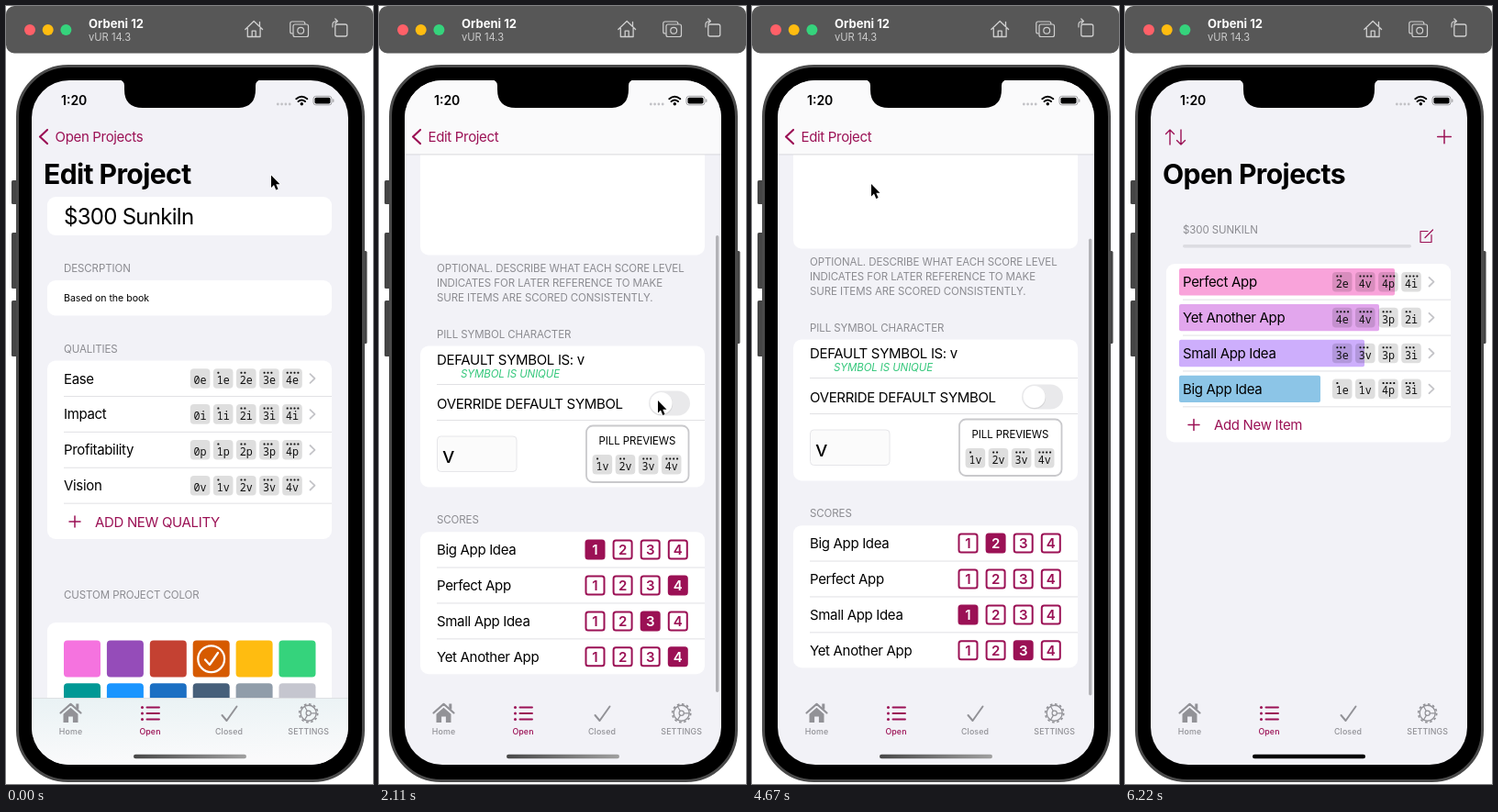
Write an HTML page that moves like this. It is 400 px wide and 848 px high and loops after 7170 ms.

```html
<!DOCTYPE html>
<html lang="en">
<head>
<meta charset="utf-8">
<title>Project scoring walkthrough</title>
<style>
  html, body { margin: 0; width: 100%; height: 100%; overflow: hidden; background: #fff; }
  svg { display: block; width: 100%; height: 100%; font-family: Inter, sans-serif; font-optical-sizing: none; }
  .body { font-size: 15px; letter-spacing: -.022em; }
  .caps { font-size: 11.5px; letter-spacing: -.008em; }
  .small { font-size: 10.6px; letter-spacing: -.003em; }
  .field { font-size: 24px; letter-spacing: -.03em; }
  .large { font-size: 30.1px; font-weight: 700; letter-spacing: -.02em; }
  .inline { font-size: 15px; font-weight: 600; letter-spacing: -.022em; }
  .tab { font-size: 8.85px; font-weight: 500; letter-spacing: .01em; }
  .clock { font-size: 14px; font-weight: 600; }
  .device { font-size: 13px; font-weight: 700; }
  .system { font-size: 11.2px; }
  .pill { font: 11.7px "Noto Sans Mono", monospace; }
  .score { font-size: 15px; font-weight: 600; }
  .note { font-size: 11.5px; font-style: italic; letter-spacing: -.01em; }
</style>
</head>
<body>
<svg id="stage" viewBox="0 0 400 848"></svg>
<script>
const LOOP = 7170, FPS = 9;
const ACCENT = '#9b1155', PAGE = '#f2f2f7', GREY = '#8b8b90', RULE = '#e1e1e4';
const ROW = 38.9, SCREEN_WIDTH = 345;

// Drawing helpers, each returning SVG markup
const rect = (x, y, w, h, r, fill, extra = '') =>
  `<rect x="${x}" y="${y}" width="${w}" height="${h}" rx="${r}" fill="${fill}" ${extra}/>`;
const circle = (x, y, r, fill, extra = '') =>
  `<circle cx="${x}" cy="${y}" r="${r}" fill="${fill}" ${extra}/>`;
const stroke = (d, color, width, extra = '') =>
  `<path d="${d}" fill="none" stroke="${color}" stroke-width="${width}" stroke-linecap="round" stroke-linejoin="round" ${extra}/>`;
const text = (x, y, s, style, fill = '#000', anchor = 'start') =>
  `<text x="${x}" y="${y}" class="${style}" fill="${fill}" text-anchor="${anchor}">${s}</text>`;
const gradient = (id, direction, from, to) =>
  `<linearGradient id="${id}" ${direction}><stop stop-color="${from}"/><stop offset="1" stop-color="${to}"/></linearGradient>`;
const group = (inner, attrs) => `<g ${attrs}>${inner}</g>`;
const repeat = (n, draw) => Array.from({ length: n }, (_, i) => draw(i)).join('');

const card = (y, h) => rect(45, y, 310, h, 9, '#fff');
const caption = (y, s) => text(63, y, s, 'caps', GREY);
const rule = y => rect(63, y - .5, 292, 1, 0, RULE);
const plus = (x, y, r, w) => stroke(`M${x - r} ${y}h${2 * r}M${x} ${y - r}v${2 * r}`, ACCENT, w);
const chevron = y => stroke(`M331.5 ${y - 4.8}l5 4.8-5 4.8`, '#c4c4c8', 1.8);

function pill(x, y, label) {
  const dots = repeat(+label[0], i => rect(x - 6.3 + i * 3.9, y - 7.3, 2, 2, .6, '#111'));
  return rect(x - 10.8, y - 10.8, 21.6, 21.6, 4, '#000', 'fill-opacity=".13"') + dots +
    text(x, y + 6, label, 'pill', '#111', 'middle');
}
const pills = (right, y, labels) =>
  labels.map((s, i) => pill(right - (labels.length - 1 - i) * 25.1, y, s)).join('');

// Piecewise linear track through [step, ...values]
function track(keys, step) {
  const next = keys.findIndex(key => key[0] > step);
  if (next === 0) return keys[0].slice(1);
  if (next < 0) return keys.at(-1).slice(1);
  const a = keys[next - 1], b = keys[next], u = (step - a[0]) / (b[0] - a[0]);
  return a.slice(1).map((v, i) => v + (b[i + 1] - v) * u);
}

// Navigation depth: 0 project list, 1 project editor, 2 quality editor
const DEPTH = [[8, 1], [9, 1.12], [10, 1.6], [11, 1.88], [12, 1.97], [13, 2],
  [45, 2], [46, 1.5], [47, 1.1], [48, 1], [49, .6], [50, .2], [51, .02], [52, 0]];
const SCROLL = [[15, 0], [16, 38], [17, 100], [18, 150], [19, 170], [20, 177]];
const CURSOR = [[1, 289, 184.5], [2, 290, 192], [3, 295, 235], [4, 308, 345], [5, 332, 490],
  [6, 348, 582], [7, 340, 545], [8, 332, 518], [12, 332, 518], [14, 325, 532], [15, 323, 522],
  [16, 321, 485], [18, 316, 400], [19, 304, 430], [21, 262, 580], [22, 258, 594],
  [24, 258, 596], [27, 258, 596], [29, 305, 625], [30, 322, 632], [31, 326, 626],
  [32, 318, 632], [34, 236, 664], [35, 240, 668], [37, 295, 702], [38, 295, 702],
  [39, 284, 665], [41, 175, 300], [42, 130, 194], [43, 103, 160], [44, 90, 147]];
const PRESSES = [[8, 332, 519, 19], [14, 326, 536, 25], [15, 324, 533, 21], [16, 321, 496, 21],
  [17, 319, 452, 21], [25, 257, 598, 26], [26, 257, 597, 16], [31, 326, 626, 16],
  [34, 236, 664, 16], [37, 295, 702, 15], [45, 90, 147, 25], [46, 90, 147, 16],
  [48, 90, 147, 25], [49, 90, 147, 16]];
const CURSOR_HIDDEN = 56;

// Score taps: step, row, value; tapping the current value clears it
const ITEMS = ['Big App Idea', 'Perfect App', 'Small App Idea', 'Yet Another App'];
const TAPS = [[25, 0, 2], [31, 1, 4], [34, 2, 1], [37, 3, 3]];
function scoresAt(step) {
  const scores = [1, 4, 3, 4];
  for (const [at, row, value] of TAPS)
    if (step >= at) scores[row] = scores[row] === value ? 0 : value;
  return scores;
}

const back = (label, pressed) => group(
  stroke('M45 135l-8 7.5 8 7.5', ACCENT, 2.2) + text(53.5, 147.5, label, 'body', ACCENT),
  `opacity="${pressed ? .2 : 1}"`);

function projectList() {
  const rows = [
    ['Perfect App', 235, '#f9a3da', '2e 4v 4p 4i'],
    ['Yet Another App', 218, '#e2a6ed', '4e 4v 3p 2i'],
    ['Small App Idea', 202, '#cdaefc', '3e 3v 3p 3i'],
    ['Big App Idea', 154, '#8cc5e7', '1e 1v 4p 3i'],
  ];
  const content = text(41, 194, 'Open Projects', 'large') + caption(248, '$300 SUNKILN') +
    rect(63, 260, 249, 3.5, 1.7, '#dcdce1') +
    stroke('M330 245.5h-8v12h12v-8M327 252.5l8.5-8.5', ACCENT, 1.2) + card(281, 194.5) +
    rows.map(([name, width, color, labels], i) => {
      const y = 300.7 + i * ROW;
      return rect(59, y - 14.7, width, 29.4, 2, color) + text(63, y + 5.5, name, 'body') +
        pills(312, y, labels.split(' ')) + chevron(y) + rule(y + ROW / 2);
    }).join('') +
    plus(75, 456.5, 6, 1.5) + text(97, 462, 'Add New Item', 'body', ACCENT);
  const nav = stroke('M49 151v-16m-4.5 4.5l4.5-4.5 4.5 4.5M61 135v16m-4.5-4.5l4.5 4.5 4.5-4.5', ACCENT, 1.4) +
    plus(348, 142.5, 7.3, 1.5);
  return { content, nav };
}

function projectEditor(step) {
  const collapsed = step > 20;
  const swatches = ['#f573df', '#954cb9', '#c44132', '#d65a00', '#ffbc10', '#35d37c',
    '#009895', '#1a95ff', '#1b6fc3', '#465f7a', '#909daa', '#c5c6cf'];
  const selected = step >= 8 && step <= 10;
  const inner = card(208, 42) + text(63, 238, '$300 Sunkiln', 'field') +
    caption(290, 'DESCRPTION') + card(299, 38.5) + text(63, 322, 'Based on the book', 'small') +
    caption(377.5, 'QUALITIES') + card(386.5, 194.5) +
    (selected ? rect(45, 503, 310, 39, 0, '#d5d5d7') : '') +
    ['Ease', 'Impact', 'Profitability', 'Vision'].map((name, i) => {
      const y = 406 + i * ROW, key = name[0].toLowerCase();
      return text(63, y + 5.5, name, 'body') + chevron(y) + rule(y + ROW / 2) +
        pills(312, y, [0, 1, 2, 3, 4].map(n => n + key));
    }).join('') +
    plus(75, 562, 6, 1.5) + text(97, 567.5, 'ADD NEW QUALITY', 'body', ACCENT) +
    caption(646, 'CUSTOM PROJECT COLOR') + card(672, 126) +
    swatches.map((c, i) => rect(63 + i % 6 * 46.9, 691.5 + Math.floor(i / 6) * 46.8, 40, 40, 4, c)).join('') +
    circle(223.7, 711.7, 14.4, 'none', 'stroke="#fff" stroke-width="2.2"') +
    stroke('M217 712.5l5 5.5 9-13', '#fff', 2.3);
  return {
    content: group(inner, `transform="translate(0 ${collapsed ? -46 : 0})"`) +
      (collapsed ? '' : text(41, 194, 'Edit Project', 'large')),
    nav: back('Open Projects', step === 48) +
      (collapsed ? text(200.5, 147.5, 'Edit Project', 'inline', '#000', 'middle') : ''),
  };
}

function scoreButton(x, y, value, chosen, pressed) {
  return group(
    rect(x - 10, y - 10, 20, 20, 2.5, chosen ? ACCENT : '#fff', `stroke="${ACCENT}" stroke-width="2"`) +
    text(x, y + 5.5, value, 'score', chosen ? '#fff' : ACCENT, 'middle'),
    `opacity="${pressed ? .48 : 1}"`);
}

function qualityEditor(step, scroll) {
  const scores = scoresAt(step);
  const inner = card(208, 42) + text(63, 238, 'Vision', 'field') +
    caption(290, 'SCORING NOTES') + card(299, 142.5) +
    caption(459.5, 'OPTIONAL. DESCRIBE WHAT EACH SCORE LEVEL') +
    caption(475.5, 'INDICATES FOR LATER REFERENCE TO MAKE') +
    caption(491.5, 'SURE ITEMS ARE SCORED CONSISTENTLY.') +
    caption(531.5, 'PILL SYMBOL CHARACTER') + card(540.5, 154) +
    text(63, 560.5, 'DEFAULT SYMBOL IS: v', 'body') +
    text(89, 575, 'SYMBOL IS UNIQUE', 'note', '#34c77b') + rule(582.5) +
    text(63, 608.5, 'OVERRIDE DEFAULT SYMBOL', 'body') +
    rect(294, 589.5, 45, 27, 13.5, '#e9e9eb') +
    circle(308, 604, 12.2, '#000', 'opacity=".08"') + circle(307.6, 603, 12, '#fff') + rule(621.5) +
    rect(63.5, 639, 86.5, 38.5, 4, '#fbfbfb', 'stroke="#e6e6e9"') + text(69, 668, 'v', 'field') +
    rect(226, 627.5, 111.5, 61.5, 7, '#fff', 'stroke="#c9c9cc" stroke-width="1.8"') +
    text(281.5, 647.5, 'PILL PREVIEWS', 'caps', '#000', 'middle') +
    pills(318.7, 669.7, ['1v', '2v', '3v', '4v']) +
    caption(734, 'SCORES') + card(743.2, 155) +
    ITEMS.map((name, row) => {
      const y = 762.6 + row * ROW;
      const pressed = col => TAPS.some(([at, r, v]) => r === row && v === col && (step === at || step === at + 1));
      return text(63, y + 5.5, name, 'body') + (row < 3 ? rule(y + ROW / 2) : '') +
        repeat(4, i => scoreButton(235.5 + i * 30.1, y, i + 1, scores[row] === i + 1, pressed(i + 1)));
    }).join('');
  const bar = rect(28, 81, SCREEN_WIDTH, 81, 0, '#fafafb') + rect(28, 161.5, SCREEN_WIDTH, .8, 0, '#d2d2d5') +
    rect(367, 165 + scroll / 2, 3.4, 498, 1.7, '#b3b3b7');
  return {
    content: group(inner, `transform="translate(0 ${-scroll})"`),
    nav: (scroll > 0 ? bar : '') + back('Edit Project', step === 45),
  };
}

function tabBar(step, depth, scroll) {
  const grey = '#929297', transparent = depth < .5 || (depth > 1.5 && scroll > 165);
  const tinted = step < 11;
  const label = (x, s, color) => text(x, 794, s, 'tab', color, 'middle');
  const backdrop = rect(28, 754, SCREEN_WIDTH, 73, 0, tinted ? 'url(#tint)' : '#fafafb') +
    rect(28, 754, SCREEN_WIDTH, .7, 0, '#d9d9dc');
  return (transparent ? '' : backdrop) +
    stroke('M59.5 770.5l11-9.7 11 9.7', grey, 2.2) + rect(76.3, 760.5, 3, 6, 0, grey) +
    `<path d="M62.5 771.8l8-7 8 7V781h-5.6v-6.5h-4.8V781h-5.6Z" fill="${grey}"/>` + label(70.5, 'Home', grey) +
    repeat(3, i => circle(148.5, 764.5 + i * 6.5, 1.5, ACCENT)) +
    stroke('M153.5 764.5h13.5m-13.5 6.5h13.5m-13.5 6.5h13.5', ACCENT, 1.9) + label(157, 'Open', ACCENT) +
    stroke('M235.5 773l5 6 11-15.5', grey, 2) + label(243, 'Closed', grey) +
    circle(329.7, 770.8, 8.5, 'none', `stroke="${grey}" stroke-width="1.4"`) +
    circle(329.7, 770.8, 10, 'none', `stroke="${grey}" stroke-width="1.7" stroke-dasharray="2.6 2.636"`) +
    circle(329.7, 770.8, 2.6, 'none', `stroke="${grey}" stroke-width="1.2"`) +
    stroke('M332.3 770.8h5.8M328.4 768.5l-2.9-5M328.4 773.1l-2.9 5', grey, 1.2) +
    label(329.7, 'SETTINGS', grey) +
    rect(139, 815.8, 123, 4.4, 2.2, step < 46 ? 'url(#fade)' : '#000');
}

const statusBar = text(60, 108, '1:20', 'clock') +
  repeat(4, i => circle(296.3 + i * 4.3, 107, 1.4, '#c2c2c6')) +
  stroke('M316.3 101.2q6-5 12 0M318.6 104q3.7-3 7.4 0', '#000', 2) + circle(322.3, 106.8, 1.7, '#000') +
  rect(335, 98.3, 20, 9.6, 2.8, 'none', 'stroke="#a0a0a3"') + rect(336.5, 99.8, 17, 6.6, 1.6, '#000') +
  rect(356.2, 101.3, 1.2, 3.6, .6, '#a0a0a3');

const TOOL = '#cfcfcf';
const toolbar = rect(0, 0, 400, 51.5, 9, '#575757') +
  ['#ff6068', '#ffbc10', '#35d37c'].map((c, i) => circle(26 + i * 19.7, 26, 6, c)).join('') +
  text(90, 24, 'Orbeni 12', 'device', '#fff') + text(90, 38, 'vUR 14.3', 'system', '#cbcbcb') +
  stroke('M260.8 25.5l9.4-9 9.4 9M263.3 24v9.5h13.8V24M268.2 33.5v-6.3h4v6.3M276.5 22v-4.5', TOOL, 1.3) +
  rect(309.8, 17, 16, 13, 2, 'none', `stroke="${TOOL}" stroke-width="1.2"`) +
  rect(313, 20, 16.5, 13.5, 2, '#575757', `stroke="${TOOL}" stroke-width="1.2"`) +
  circle(321.2, 26.8, 3.4, 'none', `stroke="${TOOL}" stroke-width="1.2"`) +
  rect(358.8, 20, 13, 13, 2, 'none', `stroke="${TOOL}" stroke-width="1.3"`) +
  stroke('M356 23v-3q0-3.5 5-3.5M358.8 14l2.6 2.5-2.6 2.5', TOOL, 1.2);

const phone = [[6, 190, 26], [6, 247, 61], [6, 321, 61], [387, 267, 101]]
    .map(([x, y, h]) => rect(x, y, 6.5, h, 1.5, '#454545')).join('') +
  rect(12.5, 65.5, 377, 779, 55, '#000', 'stroke="#4a4a4a" stroke-width="3"');

const notch = '<path d="M123 80.5q6 .5 6 6.5v4q0 20 20 20h103q20 0 20-20v-4q0-6 6-6.5Z"/>';
const defs = `<clipPath id="screen">${rect(28, 81, SCREEN_WIDTH, 746, 41, '#000')}</clipPath>` +
  gradient('tint', 'x2=".15" y2="1"', '#e9f2f4', '#fafafb') + gradient('fade', '', '#484848', '#a0a0a0');

function pointer(step) {
  const [x, y] = track(CURSOR, step);
  const press = PRESSES.find(p => p[0] === step);
  return (press ? circle(press[1], press[2], press[3], '#ff5a5f', 'opacity=".78"') : '') +
    (step < CURSOR_HIDDEN ? `<path transform="translate(${x} ${y})" d="M0 0v13.4l3-2.8 2.3 5.3 2.3-1-2.3-5.1h4.2Z" stroke="#fff" stroke-width="1.4" paint-order="stroke"/>` : '');
}

function render(step) {
  const [depth] = track(DEPTH, step), [scroll] = track(SCROLL, step);
  const screens = [projectList(), projectEditor(step), qualityEditor(step, scroll)];
  let contents = '', navs = '';
  screens.forEach(({ content, nav }, level) => {
    const shift = level - depth;
    if (Math.abs(shift) >= 1) return;
    const dx = shift * SCREEN_WIDTH * (shift > 0 ? 1 : .3);
    contents += group(rect(28, 81, SCREEN_WIDTH, 746, 0, PAGE) + content, `transform="translate(${dx} 0)"`);
    navs += group(nav, `opacity="${1 - Math.abs(shift)}"`);
  });
  return defs + toolbar + phone +
    group(contents + navs + statusBar + tabBar(step, depth, scroll), 'clip-path="url(#screen)"') +
    notch + pointer(step);
}

const stage = document.getElementById('stage');
let shown = -1;
function tick() {
  const time = performance.now() % LOOP;
  const step = Math.floor((time + 6) * FPS / 1000);
  if (step !== shown) stage.innerHTML = render(shown = step);
  requestAnimationFrame(tick);
}
tick();
</script>
</body>
</html>
```
